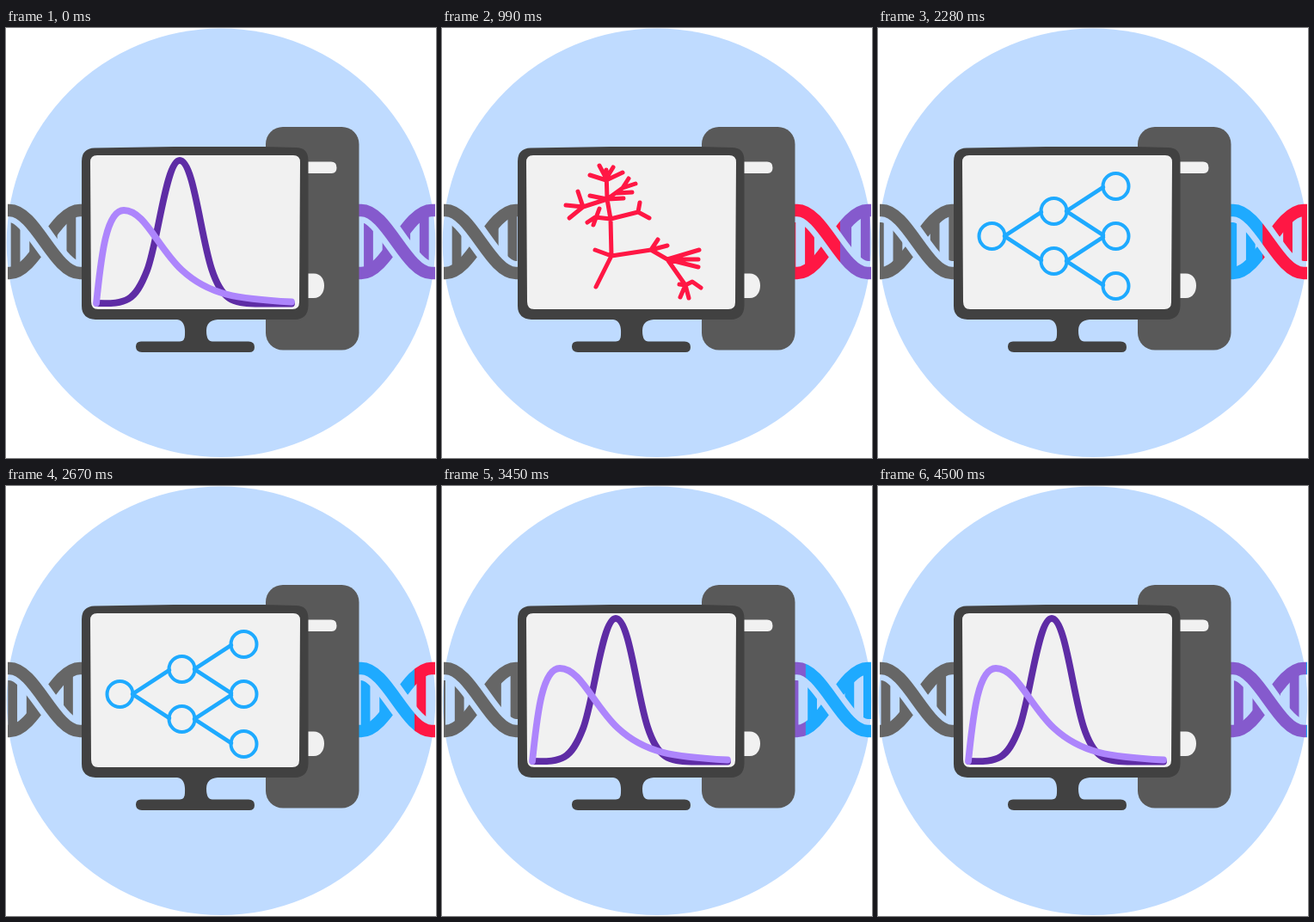
These frames come from a looping animation (500 px wide and 500 px high, 4.53 s). An HTML page:

```html
<!DOCTYPE html>
<html lang="en">
<head>
<meta charset="utf-8">
<title>DNA analysis</title>
<style>
  html, body { margin: 0; width: 100%; height: 100%; overflow: hidden; background: #fff; }
  svg { display: block; width: 500px; height: 500px; }
  .line { fill: none; stroke-linecap: round; stroke-linejoin: round; }

  .rungs { stroke-dasharray: 10.8 10.8; animation: flow 302ms linear infinite; }
  .bands { animation: sweep 4530ms linear infinite; }
  .chart { visibility: hidden; animation: show 4530ms step-end infinite; }
  .tree { animation-delay: -4260ms; }
  .network { animation-delay: -2750ms; }
  .curves { animation-delay: -1240ms; }

  @keyframes flow { to { stroke-dashoffset: -21.6px; } }
  @keyframes sweep { to { transform: translateX(324px); } }
  @keyframes show { 0% { visibility: visible; } 31.35%, 100% { visibility: hidden; } }
</style>
</head>
<body>
<svg viewBox="0 0 500 500">
  <defs>
    <path id="front" d="M-8 212H4C34 212 56 285 86 285H100"/>
    <path id="back" d="M-8 285H4C34 285 56 212 86 212H100"/>
    <path id="lens" d="M-8 212H4C34 212 56 285 86 285H100V212H86C56 212 34 285 4 285H-8Z"/>
    <clipPath id="between">
      <use href="#lens"/>
      <use href="#lens" x="409"/>
    </clipPath>
    <mask id="helix" maskUnits="userSpaceOnUse" x="2" y="190" width="497" height="120">
      <g clip-path="url(#between)">
        <path class="rungs" d="M-37.600 248.500H520" stroke="#fff" stroke-width="80"/>
      </g>
      <g fill="none" stroke="#fff" stroke-width="14.500">
        <use href="#back"/>
        <use href="#back" x="409"/>
        <g stroke="#000" stroke-width="28">
          <use href="#front"/>
          <use href="#front" x="409"/>
        </g>
        <use href="#front"/>
        <use href="#front" x="409"/>
      </g>
    </mask>
  </defs>

  <circle cx="250" cy="249.800" r="249.300" fill="#bfdbff"/>

  <g mask="url(#helix)">
    <g class="bands">
      <path fill="#855acd" d="M68 190h108v120H68zM392 190h108v120H392z"/>
      <path fill="#1eaaff" d="M176 190h108v120H176zM500 190h108v120H500z"/>
      <path fill="#ff1744" d="M284 190h108v120H284z"/>
    </g>
    <path fill="#666" d="M0 190h250v120H0z"/>
  </g>

  <rect x="302" y="115" width="108.500" height="259.500" rx="20" fill="#595959"/>
  <path fill="#f1f1f1" d="M340 155.500H378Q384.500 155.500 384.500 162.500T378 169H340ZM340 285.500H358C366 285.500 370 292 370 299.500S366 314 358 314H340Z"/>

  <path fill="#414141" d="M103 139.500L195 138H300L337 139Q351.500 139 351.500 154V323Q351 338.500 336 339H246Q233 340 233 352Q233 364.500 240 364.500H282Q289 364.500 289 371T282 377H158Q151 377 151 370.500T158 364.500H202Q208 364.500 208 357Q209 340 199 339H104Q88 338 88 323V155Q88 140 103 139.500Z"/>
  <path fill="#f1f1f1" d="M106 148H334Q342 148 342 156L341 319Q341 327 333 327H107Q99 327 99 318L98 156Q98 148 106 148Z"/>

  <g class="chart curves line" stroke-width="7.800">
    <path stroke="#5e2ca5" d="M106 320C140 321 150 318 164 282C177 248 186 154 202 154S226 240 239 280C251 317 264 320 290 320.500H332"/>
    <path stroke="#ad85fc" d="M105 320C110 275 115 212 137 212C161 212 175 253 204 281C236 311 270 315 332 318.500"/>
  </g>

  <path class="chart tree line" stroke="#ff1744" stroke-width="5" d="M179 301L197 265L196 222L192 199L191 165
    M178 258L197 265L243 258L262 269L283 299
    M243 258L251 246M243 258L262 253
    M262 269L299 258M262 269L298 278M262 269L298 269
    M283 299L277 313M283 299L287 314M283 299L291 295L301 302M276 298L283 299
    M183 160L191 175L199 162M172 171L191 177L210 168
    M192 199L210 186L225 181M210 186L217 175M203 192L221 191M172 195L192 199L211 198
    M192 199L164 208L144 206M164 208L158 190M164 208L148 221
    M196 222L228 214L241 221M228 214L230 203M196 222L178 220L169 226M183 210L176 229"/>

  <g class="chart network line" stroke="#1eaaff" stroke-width="4.500">
    <path d="M147 242L190 214M147 242L190 270M219 213L262 185M219 213L262 241M219 271L262 243M219 271L262 299"/>
    <g stroke-width="4">
      <circle cx="132.500" cy="242" r="15"/>
      <circle cx="204.500" cy="213" r="15"/>
      <circle cx="204.500" cy="271" r="15"/>
      <circle cx="276.500" cy="184" r="15"/>
      <circle cx="276.500" cy="242" r="15"/>
      <circle cx="276.500" cy="300" r="15"/>
    </g>
  </g>
</svg>
</body>
</html>
```
